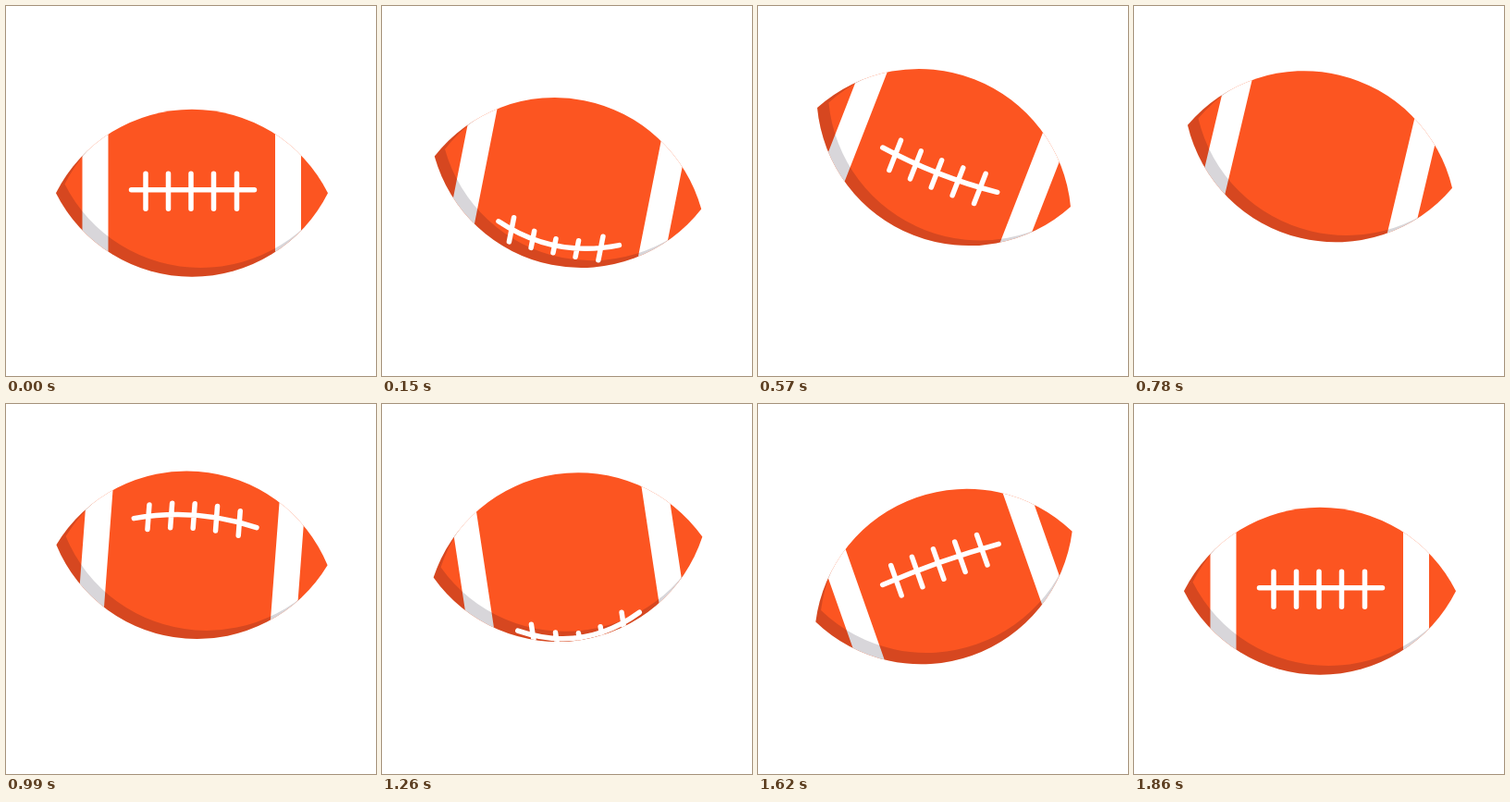
Write an HTML page that moves like this. It is 400x400 px and loops after 1920 ms.

```html
<!DOCTYPE html>
<html lang="en">
<head>
<meta charset="utf-8">
<title>Rolling ball</title>
<style>
  html, body { margin: 0; width: 100%; height: 100%; overflow: hidden; background: #fff; }
  svg { display: block; width: 100vw; height: 100vh; }
</style>
</head>
<body>
<svg viewBox="0 0 400 400">
  <defs>
    <clipPath id="hull"><path d="M-147 0A164.6 164.6 0 0 1 147 0A164.6 164.6 0 0 1 -147 0Z"/></clipPath>
  </defs>
  <g id="ball">
    <path fill="#fc5521" d="M-147 0A164.6 164.6 0 0 1 147 0A164.6 164.6 0 0 1 -147 0Z"/>
    <g clip-path="url(#hull)">
      <path fill="#fff" d="M-118.5-100h28v200h-28zM90-100h28v200h-28z"/>
      <path fill="#12001e" fill-opacity=".16" fill-rule="evenodd"
        d="M-200-200H200V200H-200ZM-137.5-9.8A164.6 164.6 0 0 1 156.5-9.8A164.6 164.6 0 0 1 -137.5-9.8Z"/>
      <path id="laces" fill="none" stroke="#fff" stroke-width="5.5" stroke-linecap="round"/>
    </g>
  </g>
</svg>
<script>
const LOOP = 1920, STEP = 30, LAST = 1860;
const ball = document.getElementById('ball');
const laces = document.getElementById('laces');

// [time, value]
const height = [[0, 202.2], [330, 170.5], [570, 163.5], [990, 163.2], [1260, 165.6], [1620, 186.6], [1860, 202.2]];
const tilt = [[0, 0], [330, 25.9], [570, 21.3], [990, 4.3], [1260, -8.6], [1620, -19.4], [1860, 0]];

// Times at which the laces pass the middle, and their speed in px/ms
const passes = [0, 525, 1072, 1646];
const SPEED = 0.485, REST = -3.4;
const stitches = [-50, -25.5, -1, 23.5, 48.5];

// Slope at a key: flat at both ends and at turning points
function slope(keys, i) {
  if (i === 0 || i === keys.length - 1) return 0;
  const [a, b, c] = [keys[i - 1], keys[i], keys[i + 1]];
  if ((b[1] - a[1]) * (c[1] - b[1]) <= 0) return 0;
  return (c[1] - a[1]) / (c[0] - a[0]);
}

function sample(keys, t) {
  let i = 0;
  while (i < keys.length - 2 && t >= keys[i + 1][0]) i++;
  const [t0, v0] = keys[i], [t1, v1] = keys[i + 1];
  const d = t1 - t0, u = (t - t0) / d, w = 1 - u;
  return v0 * (1 + 2 * u) * w * w + v1 * u * u * (3 - 2 * u)
    + d * u * w * (w * slope(keys, i) - u * slope(keys, i + 1));
}

function rollOffset(t) {
  const end = passes[passes.length - 1];
  if (t >= end) return 0;
  const near = passes.reduce((a, b) => Math.abs(t - b) < Math.abs(t - a) ? b : a);
  return SPEED * (t - near);
}

function lacePath(offset) {
  const size = Math.abs(offset), k = size / 100, above = offset < 0;
  const bend = above ? size * (0.18 + 0.0008 * size) : -size * 0.19;
  const mid = REST + offset, end = mid + bend;
  let d = `M-65.5 ${end}Q1 ${mid - bend} 67.5 ${end}`;
  for (const x of stitches) {
    const shrink = above ? 14.5 : 15.5 - 7.4 * (x / 49) ** 2;
    const half = Math.max(2, 19 - shrink * k);
    const y = mid + bend * ((x - 1) / 66.5) ** 2 + 1.5 * Math.max(0, 1 - k);
    d += `M${x} ${y - half}V${y + half}`;
  }
  return d;
}

function draw(now) {
  const t = Math.min(LAST, Math.floor((now % LOOP) / STEP) * STEP);
  ball.setAttribute('transform', `translate(201 ${sample(height, t)}) rotate(${sample(tilt, t)})`);
  laces.setAttribute('d', lacePath(rollOffset(t)));
}

let start;
function tick(now) {
  start ??= now;
  draw(Math.max(0, now - start));
  requestAnimationFrame(tick);
}
draw(0);
requestAnimationFrame(tick);
</script>
</body>
</html>
```
